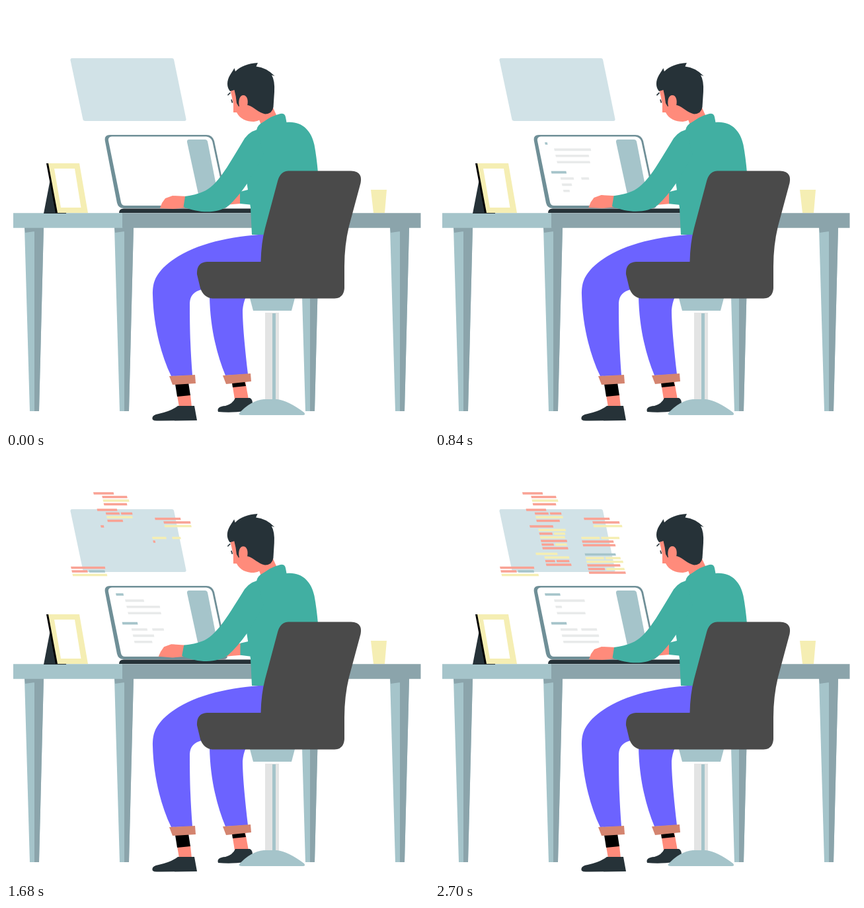
Recreate the animation shown at these times as an HTML page. Size 640 px wide and 640 px high, loop 2730 ms.

```html
<!DOCTYPE html>
<html lang="en">
<head>
<meta charset="utf-8">
<title>Working at a desk</title>
<style>
  html, body { margin: 0; width: 100%; height: 100%; overflow: hidden; background: #fff; }
  svg { display: block; width: 100vw; height: 100vh; }
  .light { fill: #a5c4ca; }
  .mid { fill: #8ba4ab; }
  .dark { fill: #263238; }
  .skin { fill: #ff8b7b; }
  .shirt { fill: #41afa2; }
  .jeans { fill: #6c63ff; }
  .cuff { fill: #d4846f; }
  .cream { fill: #f5eeb3; }
  .chair { fill: #4a4a4a; }
  .white { fill: #fff; }
</style>
</head>
<body>
<svg viewBox="0 0 640 640">
  <defs>
    <g id="leg">
      <path class="light" d="M0 335H29L22 613H8Z"/>
      <path class="mid" d="M15 335H29L22 613H15ZM0 335H29L15 341 1 343Z"/>
    </g>
  </defs>

  <path fill="#d1e2e7" d="M100 79H251Q253.500 79 254 81L272.500 171Q273 174 270 174H120Q117 174 116.500 172L97.500 82Q97 79 100 79Z"/>
  <g id="code"></g>

  <use href="#leg" x="28"/><use href="#leg" x="164"/><use href="#leg" x="445"/><use href="#leg" x="581"/>
  <path class="light" d="M11 313.300H177V335.700H11Z"/>
  <path class="mid" d="M176 313.300H627.500V335.700H176Z"/>

  <path class="dark" d="M67 262 57 314H91V312H77Z"/>
  <path d="M61 238H65L79 313H75Z"/>
  <path class="cream" d="M64 238H111L124 313H78Z"/>
  <path class="white" d="M73 246H104L113.500 305H83Z"/>
  <path class="cream" d="M552 278H576L573 313H556Z"/>

  <path fill="#6f8f97" d="M157 195H303Q312 195 315 204L335 299Q336 306 329 306H178Q170 306 168 298L150 205Q148 195 157 195Z"/>
  <path class="white" d="M160 197.500H303Q310 198 312.300 205L332 297Q333 302 327 302H180Q175 302 174 297L155 204Q154 198 160 197.500Z"/>
  <path class="light" d="M277 202H301Q304 202 305 205L323 297H296Q294 297 293 294L274 206Q273.500 202 277 202Z"/>
  <g id="screen"></g>
  <path class="dark" d="M171 313Q171 306.500 178 306.500H375V313Z"/>

  <path class="skin" id="farHand"/>
  <path class="shirt" id="farSleeve"/>

  <path class="skin" d="M342 570 362 568 367 595H346Z"/>
  <path d="M342 570 361 568 363 575 343 577Z"/>
  <path class="dark" d="M321 614Q318 606 332 605 343 602 347 593H369Q373 595 373 601L362 613Q340 616 321 614Z"/>
  <path class="jeans" d="M308 440C309 485 318 525 332 559L366 557C361 515 358 480 358 460Q359 449 363 440Z"/>
  <path class="cuff" d="M328 559 370 556 371 568 333 572Z"/>

  <path class="skin" d="M259 589 279 588 281 607H262Z"/>
  <path d="M256 572 276 570 279 589 259 591Z"/>
  <path class="dark" d="M222 626Q219 619 231 617 250 613 260 605H285L289 627Q250 627.500 228 627.500 224 627.500 222 626Z"/>
  <path class="jeans" d="M395 345C330 349 272 363 238 396 224 411 222 421 222 437 223 480 233 525 250 560L282 559C279 520 278 490 278 449Q279 433 296 429L400 420Z"/>
  <path class="cuff" d="M247 560 286 558 287 571 252 573Z"/>

  <path class="skin" d="M380 164 404 154 410 167 386 180Z"/>
  <g id="head">
    <path class="skin" d="M339 125 344 148 344 161 349 161C354 171 364 175 375 175Q386 174 392 164L385 125Z"/>
    <path class="dark" d="M335 118C335 108 341 102 345.500 94L347 99C355 91 366 87 381 86L378.500 91.500Q394 93 406.500 106L402 104.500Q407 113 406 130L404.500 153Q403 163 392 163.500C381 161 376 153 366 150L352 152 349 147Q348 136 345.500 127L339 129Q335 124 335 118Z"/>
    <path class="skin" d="M353 152C351 142 354 135 359 135 365 135 367 143 365 151L370 158 356 160Z"/>
    <path fill="none" stroke="#263238" stroke-width="1.600" d="M335.500 135 339.500 131M341 141.500 342.500 146.500"/>
  </g>
  <path class="shirt" d="M379 188Q380 180 390 175 402 166 415 163 422 162 423 168L424.500 176C447 173.500 462 188 466.500 210Q470 229 472 252L460 300 395 346H372L370 305 364 265 358 208Q365 192 379 188Z"/>
  <path class="skin" id="hand"/>
  <path class="shirt" id="sleeve"/>

  <path class="light" d="M369 442H437L432 461H374Z"/>
  <path fill="#e3e4e4" d="M392 464H413V600H392Z"/>
  <path class="light" d="M403 465H408V600H403Z"/>
  <path class="light" d="M353 616Q370 597 390 595H410Q427 597 451 615 454 619 449 619H357Q351 619 353 616Z"/>
  <path class="chair" d="M427 249.500H522Q540 250 536.500 268L519 333Q512 362 512 394V427Q511 442 497 442.500H312Q299 441 294 427L289 406Q288 388 304 387H385.500Q386 359 392 336L411 265Q415 250 427 249.500Z"/>
</svg>
<script>
const LOOP = 2730, STEP = 30, SWING = 900, RETYPE = 780;
const INK = { r: '#f9a294', y: '#f5eeb3', b: '#a5c4ca', g: '#e8eaea' };
const byId = id => document.getElementById(id);
const clamp = v => Math.max(0, Math.min(1, v));
const mix = (a, b, k) => a + (b - a) * k;
const out = k => 1 - (1 - clamp(k)) ** 2;

function seeded(seed) {
  return () => {
    const v = Math.sin(seed++ * 12.9898) * 43758.5453;
    return v - Math.floor(v);
  };
}
const rand = seeded(4);

// Lay out code as slanted bars: letters are inks, spaces end rows, slashes end stanzas.
// The first row of a stanza is its heading; the others are indented.
function layout(parent, { text, x, y, row, space, indent, width, lead, split, start }) {
  const bars = [], left = x, top = y;
  for (const stanza of text.split('/')) {
    stanza.split(' ').forEach((inks, r) => {
      const total = width * (r ? 1 : lead) * mix(0.88, 1.12, rand());
      const share = inks.length > 1 ? mix(0.38, 0.55, rand()) : 1;
      x = left + 0.22 * (y - top) + (r ? indent : 0);
      [...inks].forEach((ink, i) => {
        const w = total * (i ? 1 - share : share);
        const el = document.createElementNS('http://www.w3.org/2000/svg', 'path');
        el.setAttribute('fill', INK[ink]);
        parent.append(el);
        bars.push({ el, x, y, w, start: start(bars.length) });
        x += w + split;
      });
      y += row;
    });
    y += space;
  }
  return bars;
}

function drawBar({ el, x, y, w }, k) {
  w *= k;
  el.setAttribute('d', w < 0.8 ? '' :
    `M${x} ${y - 1.8}h${w - 0.8}l.8 3.6h${0.8 - w}Z`);
}

const small = { row: 5.5, space: 3, indent: 12, lead: 1, split: 1.5 };
const columns = [
  { ...small, text: 'r r y r/r rr y r/r y ry y r ry r/y y rr r', x: 132, y: 55,
    width: 39, lead: 0.83, time: 150, start: i => 1200 + 52 * i },
  { ...small, text: 'r r y', x: 225, y: 93.5,
    width: 45, time: 300, start: i => 1312 + 71 * i },
  { ...small, text: 'yy r r/b yy y r ry r', x: 221, y: 122.5, space: 8.5, indent: 0,
    width: 51, time: 300, start: i => 1525 + 71 * i },
  { ...small, text: 'r rb y', x: 98, y: 167.5, indent: 0,
    width: 53, time: 150, start: i => 1308 + 87 * i }
];
const code = columns.flatMap(c =>
  layout(byId('code'), c).map(bar => ({ ...bar, time: c.time })));

const screen = layout(byId('screen'), {
  text: 'b g g g/b gg g g', x: 166, y: 208, row: 9.4, space: 6, indent: 12,
  width: 56, lead: 0.45, split: 5,
  start: i => 30 + 780 * Math.sin(i / 8 * Math.PI / 2)
});

// Type, hold, erase, repeat
function retyped(t, start) {
  if (t < start) return 0;
  const phase = (t - start) % RETYPE;
  return Math.min(out(phase / 300), clamp((RETYPE - phase) / 120));
}

// Limbs as pairs of matching paths: hands down, hands up
const limbs = {
  hand: ['M233 306L236 298 241 291 252 287 274 288 272 305 253 307Z',
         'M219 280L225 275 229 268 240 264 264 268 257 287 245 286Z'],
  sleeve: ['M380 187Q365 191 357 207C339 236 321 272 298 281Q287 286 271 288L268.500 304C296 315 322 313 337 302Q352 288 366 267L390 225Z',
           'M380 187Q365 191 355 207C336 232 309 266 290 267.500Q277 269 260 268L254 286C280 300 312 302 331 289Q346 277 361 261L390 225Z'],
  farHand: ['M331 301L333 293 339 284 346 282 355 281 355 299 343 300Z',
            'M327 306.500L330 298 336 290 344 286 358 287 358 304 345 305Z'],
  farSleeve: ['M354 281L374 276 374 301 354 299Z',
              'M357 286L376 283 376 308 357 304Z']
};
const number = /\d+(\.\d+)?/g;
function morph([a, b], k) {
  const ends = b.match(number);
  let i = 0;
  return a.replace(number, n => mix(+n, +ends[i++], k).toFixed(2));
}

function draw(t) {
  const lift = (1 - Math.cos(t / SWING * 2 * Math.PI)) / 2;
  for (const id in limbs) byId(id).setAttribute('d', morph(limbs[id], lift));
  byId('head').setAttribute('transform', `rotate(${-1.5 * lift} 396 173)`);
  for (const bar of code) drawBar(bar, out((t - bar.start) / bar.time));
  for (const bar of screen) drawBar(bar, retyped(t, bar.start));
}

const begin = performance.now();
function tick() {
  const t = (performance.now() - begin) % LOOP;
  draw(Math.floor(t / STEP) * STEP);
  requestAnimationFrame(tick);
}
tick();
</script>
</body>
</html>
```
